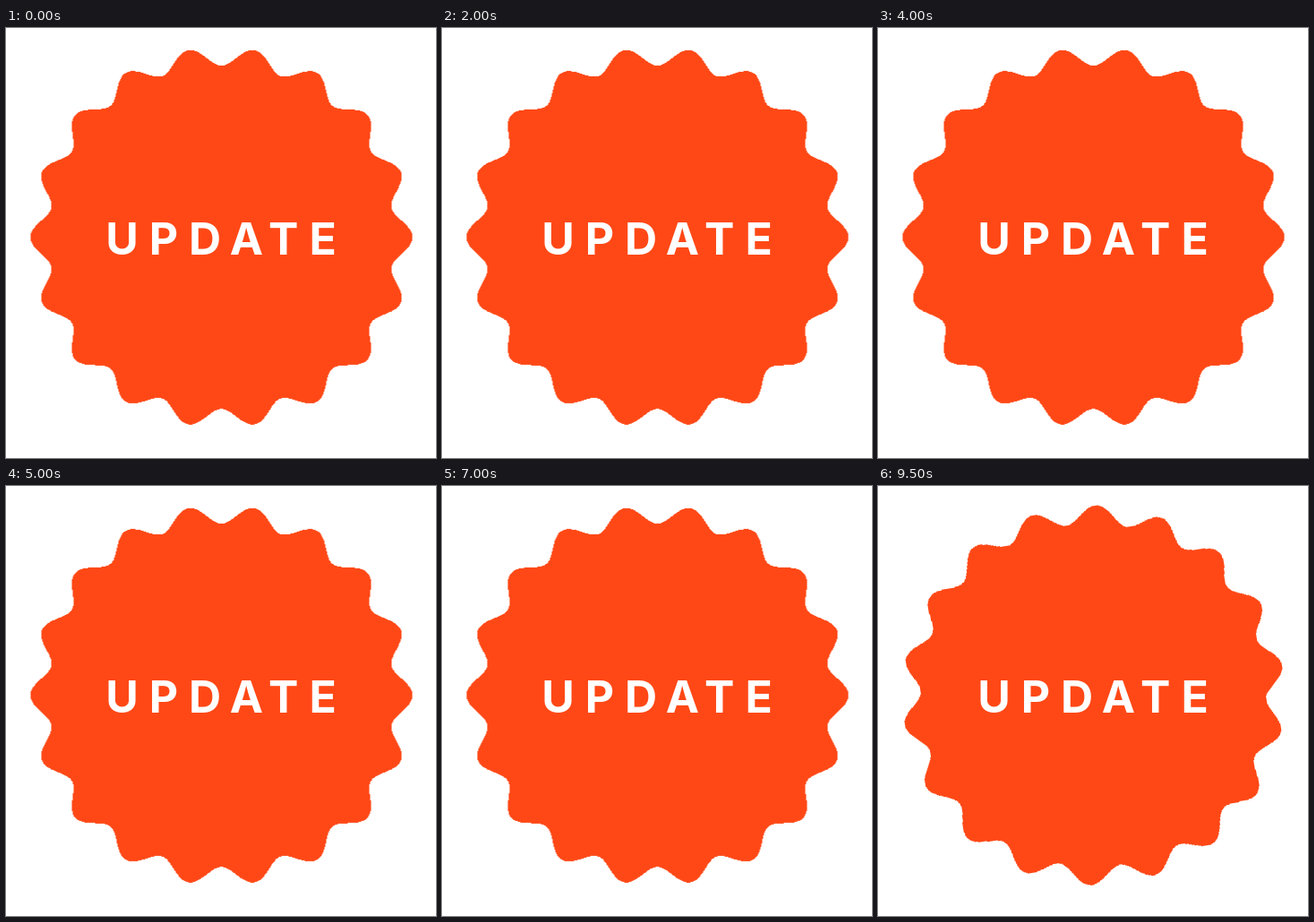
Recreate the animation shown at these times as an HTML page. Size 480 by 480 pixels, loop 10000 ms.

```html
<!DOCTYPE html>
<html lang="en">
<head>
<meta charset="utf-8">
<title>Update badge</title>
<style>
  html, body { margin: 0; width: 100%; height: 100%; overflow: hidden; background: #fff; }
  svg { display: block; width: 100vw; height: 100vh; }
  #badge { fill: #ff4816; transform-origin: 0 0; shape-rendering: crispEdges; }
  text { fill: #fff; font: 700 50px Inter, "Open Sans", sans-serif; text-anchor: middle; }
</style>
</head>
<body>
<svg viewBox="0 0 480 480">
  <g transform="translate(240.5 233.6) scale(1 .994)"><path id="badge"/></g>
  <text x="129.6 176 222 268.4 309.6 353.8" y="252.5">UPDATE</text>
</svg>
<script>
  const WAVES = 18, RADIUS = 203, DEPTH = 10.3, STEPS = 720;
  const badge = document.getElementById('badge');

  const points = Array.from({ length: STEPS }, (_, i) => {
    const a = i / STEPS * Math.PI * 2;
    const r = RADIUS + DEPTH * Math.cos(WAVES * a);
    return (r * Math.cos(a)).toFixed(2) + ' ' + (r * Math.sin(a)).toFixed(2);
  });
  badge.setAttribute('d', 'M' + points.join('L') + 'Z');

  // Two poses, half a second each
  const poses = [[0, 0], [0.5, -9], [1, -9]];
  badge.animate(
    poses.map(([offset, deg]) => ({ offset, transform: `rotate(${deg}deg)`, easing: 'step-end' })),
    { duration: 1000, iterations: Infinity }
  );
</script>
</body>
</html>
```
